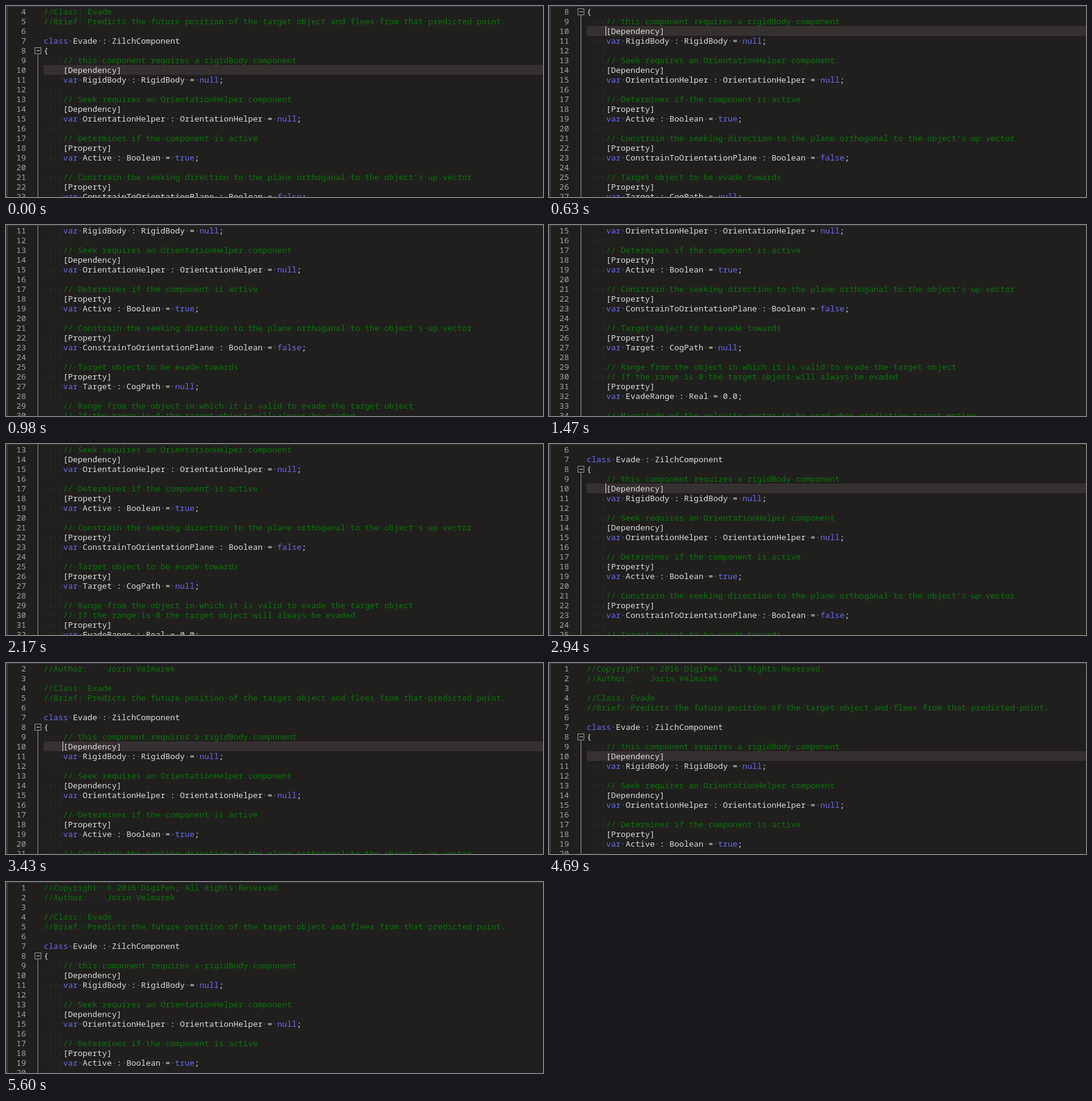
An HTML page that plays this animation: 883x314 px, repeating every 5.67 s.

```html
<!DOCTYPE html>
<html lang="en">
<head>
<meta charset="utf-8">
<title>Code scrolling</title>
<style>
  html, body { margin: 0; width: 100%; height: 100%; overflow: hidden; background: #201f1e; }
  svg { display: block; }
  text { font: 13.333px "Noto Sans Mono", "DejaVu Sans Mono", monospace; fill: #dcdcdc; }
  .num { fill: #a3a3a3; text-anchor: end; }
  .note { fill: #067806; }
  .key { fill: #6a69f0; }
</style>
</head>
<body>
<svg id="stage" width="883" height="314" viewBox="0 0 883 314"></svg>
<script>
const LOOP = 5670, ROW = 16, COL = 8, LEFT = 62;

const SLASHES = "/".repeat(2), INDENT = " ".repeat(4);
const head = text => SLASHES + text;
const note = text => INDENT + SLASHES + " " + text;
const field = (tag, notes, decl) =>
  [...notes.map(note), `${INDENT}[${tag}]`, `${INDENT}var ${decl};`, INDENT];

const CODE = [
  head("Copyright: © 2016 DigiPen, All Rights Reserved."),
  head("Author:    Jorin Velmarek"),
  "",
  head("Class: Evade"),
  head("Brief: Predicts the future position of the target object and flees from that predicted point."),
  "",
  "class Evade : ZilchComponent",
  "{",
  ...field("Dependency", ["this component requires a rigidBody component"], "RigidBody : RigidBody = null"),
  ...field("Dependency", ["Seek requires an OrientationHelper component"], "OrientationHelper : OrientationHelper = null"),
  ...field("Property", ["Determines if the component is active"], "Active : Boolean = true"),
  ...field("Property", ["Constrain the seeking direction to the plane orthoganal to the object's up vector"],
    "ConstrainToOrientationPlane : Boolean = false"),
  ...field("Property", ["Target object to be evade towards"], "Target : CogPath = null"),
  ...field("Property", [
    "Range from the object in which it is valid to evade the target object",
    "If the range is 0 the target object will always be evaded"
  ], "EvadeRange : Real = 0.0"),
  note("Magnitude of the velocity vector to be used when prediction target motion"),
  note("A greater value makes the object look further ahead of the target when it tries to evade it.")
];

// [time, first visible line]
const SCROLL = [
  [0, 4], [210, 5], [420, 6], [490, 7], [630, 8], [770, 9], [840, 10], [980, 11],
  [1120, 12], [1260, 13], [1330, 14], [1470, 15], [1680, 16], [1890, 15], [2030, 14],
  [2170, 13], [2310, 12], [2380, 11], [2520, 10], [2660, 9], [2730, 8], [2870, 7],
  [2940, 6], [3080, 5], [3220, 4], [3360, 3], [3430, 2], [3500, 1]
];
const CARET = [[0, 0], [630, 1], [1190, 0], [1750, 1], [2310, 0], [2870, 1],
  [3570, 0], [4060, 1], [4690, 0], [5320, 1], [5600, 0]];
const FOCUS = [[0, 1], [5600, 0]];

const stage = document.getElementById("stage");

function add(parent, tag, attrs, text) {
  const el = document.createElementNS("http://www.w3.org/2000/svg", tag);
  for (const k in attrs) el.setAttribute(k, attrs[k]);
  if (text) el.textContent = text;
  return parent.appendChild(el);
}
const rect = (parent, x, y, width, height, fill) =>
  add(parent, "rect", { x, y, width, height, fill, "shape-rendering": "crispEdges" });

const rowY = n => 1 + ROW * (n - 1);

function drawSpaces(doc, line, y, isNote) {
  const indent = line.search(/\S|$/);
  [...line].forEach((ch, c) => {
    if (ch !== " ") return;
    const x = LEFT + COL * c + 3;
    const inside = c >= indent;
    const fill = !inside ? "#4c4d4a" : isNote ? "#066006" : "#77776f";
    if (c % 2 && (isNote || !inside)) {
      rect(doc, x, y + 7, 1, 1, fill);
      rect(doc, x, y + 11, 1, 1, fill);
    } else {
      rect(doc, x, y + 8, inside ? 2 : 1, 1, fill);
    }
  });
}

function drawLine(doc, line, n) {
  const y = rowY(n), base = y + 13;
  const isNote = line.trim().startsWith(SLASHES);
  add(doc, "text", { x: 33, y: base, class: "num" }, String(n));
  drawSpaces(doc, line, y, isNote);
  const parts = isNote ? /\S+/g : /[A-Za-z]+|[^\sA-Za-z]+/g;
  for (const m of line.matchAll(parts)) {
    const isKey = /^(class|var|null|true|false)$/.test(m[0]);
    const kind = isNote ? "note" : isKey ? "key" : "code";
    add(doc, "text", { x: LEFT + COL * m.index, y: base, class: kind }, m[0]);
  }
}

function drawFold(doc) {
  const y = rowY(8), grey = "#969696";
  rect(doc, 52, y + 14, 1, ROW * 32, grey);
  add(doc, "rect", { x: 47.5, y: y + 3.5, width: 10, height: 10, fill: "none", stroke: grey });
  rect(doc, 50, y + 8, 6, 1, "#c4c4c4");
}

// Each value holds until the next step.
function play(el, steps, style) {
  const frames = steps.map(([t, v]) => ({ ...style(v), offset: t / LOOP, easing: "steps(1, end)" }));
  frames.push({ ...style(steps[steps.length - 1][1]), offset: 1 });
  el.animate(frames, { duration: LOOP, iterations: Infinity }).startTime = 0;
}

rect(stage, 0, 0, 883, 314, "#201f1e");
const doc = add(stage, "g", {});
const band = rect(doc, LEFT, rowY(10), 821, ROW, "#353130");
CODE.forEach((line, i) => drawLine(doc, line, i + 1));
drawFold(doc);
const caret = rect(doc, 93, rowY(10), 1, ROW, "#e6e6e6");
rect(stage, 0, 0, 883, 1, "#3d3c3c");
rect(stage, 0, 0, 3, 314, "#3a3939");

const shown = v => ({ opacity: v });
play(doc, SCROLL, top => ({ transform: `translateY(${-ROW * (top - 1)}px)` }));
play(caret, CARET, shown);
play(band, FOCUS, shown);
</script>
</body>
</html>
```
